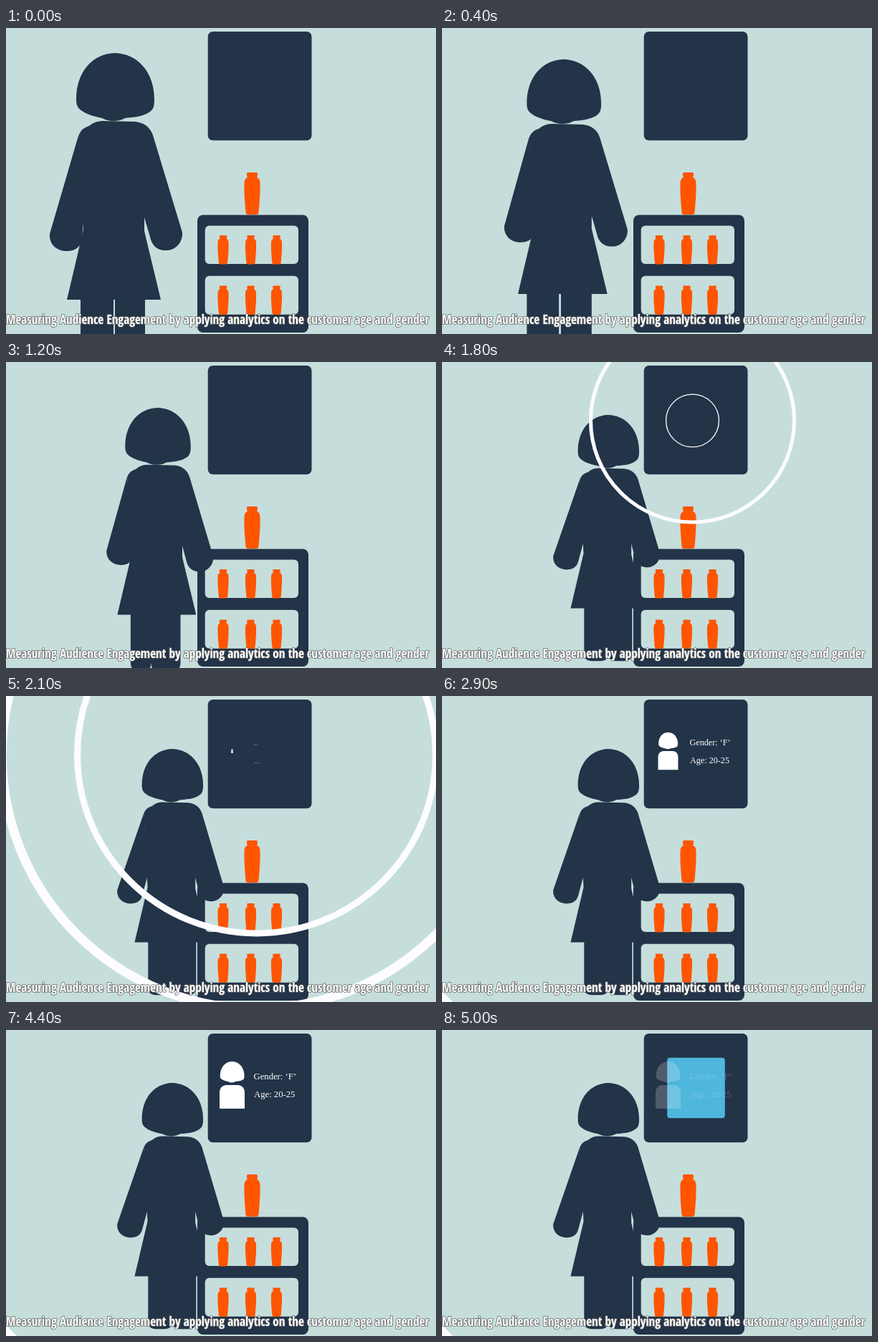
An HTML page for the animation above (5.1 s loop, 600 px wide and 428 px high).

```html
<!DOCTYPE html>
<html lang="en">
<head>
<meta charset="utf-8">
<title>Audience engagement</title>
<style>
  html, body { margin: 0; width: 100%; height: 100%; overflow: hidden; background: #c5dedc; }
  svg { display: block; width: 600px; height: 428px; }
  .dark { fill: #233348; }
  .light { fill: #c5dedc; }
  .label { font: 12.7px "Liberation Serif", serif; }
  #caption {
    font: 800 15px "Open Sans Condensed", "Roboto Condensed", "Open Sans", sans-serif;
    font-stretch: 75%;
    fill: #fff; stroke: #666; stroke-width: 1.6px; stroke-linejoin: round; paint-order: stroke;
  }
</style>
</head>
<body>
<svg viewBox="0 0 600 428">
  <defs>
    <path id="hair" d="M152 35C184 36 207 62 207 100C207 113 204 116 196 120C188 124 177 125 166 126Q160 130 150 130Q141 130 134 126C124 124 113 121 106 116C100 112 98 108 98 100C98 62 120 36 152 35Z"/>
    <path id="bottle" d="M-6 0H6Q7.500 0 7.500 2V5L6.500 7Q11 8.500 11 15C11.500 30 10 44 9 56Q8.500 59 6 59H-6Q-8.500 59 -9 56C-10 44 -11.500 30 -11 15Q-11 8.500 -6.500 7L-7.500 5V2Q-7.500 0 -6 0Z"/>
  </defs>

  <rect class="light" width="600" height="428"/>
  <rect class="dark" x="281.700" y="5" width="144.800" height="152.300" rx="7"/>
  <rect id="panel" fill="#4fb6dc"/>
  <g id="profile" fill="#fff">
    <g id="icon">
      <use href="#hair" transform="translate(315.500 44) scale(.31) translate(-152 -35)"/>
      <path d="M298 110V88C298 82 301 77 308 77H323C330 77 333 82 333 88V110Z"/>
    </g>
    <text class="label" id="gender">Gender: ‘F’</text>
    <text class="label" id="age">Age: 20-25</text>
  </g>

  <rect class="dark" x="267" y="261.500" width="155" height="164.500" rx="8"/>
  <rect class="light" x="277.700" y="276.500" width="130.300" height="53.500" rx="6"/>
  <rect class="light" x="277.700" y="346.700" width="130.300" height="54" rx="6"/>
  <g id="bottles" fill="#ff5500"></g>

  <g id="woman" class="dark">
    <use href="#hair"/>
    <path d="M101.500 150Q105 140 116 137Q124 130 135 130L180 131Q199 133 205 150L193 267V284L216 380H85L108 282Z"/>
    <path id="leftArm"/>
    <path id="rightArm"/>
    <path id="legs"/>
  </g>

  <g fill="none" stroke="#fdfcff">
    <circle class="ring" cx="349.500" cy="82"/>
    <circle class="ring" cx="349.500" cy="82"/>
  </g>
  <text id="caption" x="0" y="413.500">Measuring Audience Engagement by applying analytics on the customer age and gender</text>
</svg>
<script>
const LOOP = 5100, STEP = 100;
const $ = id => document.getElementById(id);
const set = (el, attrs) => { for (const k in attrs) el.setAttribute(k, attrs[k]); };
const ramp = (t, start, length) => Math.min(1, Math.max(0, (t - start) / length));
const mix = (a, b, p) => a + (b - a) * p;

// Bottles: one on top, three on each shelf
const bottles = [[343.5, 202, 1]];
for (const y of [290, 360.5]) for (const x of [303, 341.5, 377.5]) bottles.push([x, y, .685]);
$('bottles').innerHTML = bottles
  .map(([x, y, s]) => `<use href="#bottle" transform="translate(${x} ${y}) scale(${s})"/>`).join('');

// Walking pose: time, left hand dx and dy, left leg start and end, right leg start and end
const POSES = [
  [0, 0, 0, 104, 150, 152, 194],
  [400, 4, -8, 98, 145, 148, 193],
  [1200, 6, -15, 107, 141, 141, 190],
  [1600, -7, -1, 109, 152, 152, 194.5]
];

function poseAt(t) {
  let i = 0;
  while (i < POSES.length - 2 && t >= POSES[i + 1][0]) i++;
  const a = POSES[i], b = POSES[i + 1];
  const p = ramp(t, a[0], b[0] - a[0]);
  return a.slice(1).map((v, k) => mix(v, b[k + 1], p));
}

const leg = (a, b) =>
  `M${a} 370H${b}V460Q${b} 474 ${b - 14} 474H${a + 14}Q${a} 474 ${a} 460Z`;

// Outer edge, rounded hand, inner edge; the hand moves by dx, dy
function arm(id, shoulder, hand, inner, dx, dy) {
  const [start, ...rest] = hand.map(([x, y]) => `${x + dx} ${y + dy}`);
  set($(id), { d: `M${shoulder}L${start}C${rest.join(' ')}L${inner}Z` });
}

function drawWoman(t) {
  const p = ramp(t, 60, 1530);
  const [dx, dy, a, b, c, d] = poseAt(t);
  set($('woman'), {
    transform: `translate(${mix(152, 232, p)} ${mix(35, 74, p)}) scale(${mix(1, .784, p)}) translate(-152 -35)`
  });
  arm('leftArm', '101.5 149',
    [[61, 288], [60, 302], [70, 312], [85, 312], [97, 312], [104, 306], [106, 296]],
    '109 258', dx, dy);
  arm('rightArm', '205 150',
    [[246, 286], [247, 300], [236, 312], [222, 311], [210, 311], [203, 303], [201, 292]],
    '193 265L180 150', -2 * p, -4 * p);
  set($('legs'), { d: leg(a, b) + leg(c, d) });
}

function drawRings(t) {
  document.querySelectorAll('.ring').forEach((ring, i) => {
    const r = 490 * ramp(t, 1600 + 148 * i, 690);
    set(ring, { r, 'stroke-width': r * .036 });
  });
}

function drawScreen(t) {
  const zoom = (id, x, y, s, back = '') =>
    set($(id), { transform: `translate(${x} ${y}) scale(${s})${back}` });
  const text = ramp(t, 1990, 950);
  zoom('icon', 315.5, 77, ramp(t, 2010, 1115), ' translate(-315.5 -77)');
  zoom('gender', 345.5, 69, text);
  zoom('age', 346, 94, text);
  set($('profile'), { opacity: 1 - ramp(t, 4480, 650) });

  const k = ramp(t, 4500, 900), w = 145 * k, h = 152 * k;
  set($('panel'), { x: 354.5 - w / 2, y: 81 - h / 2, width: w, height: h, rx: 7 * k });
}

// Font size follows the measured line, so the caption spans the stage in any fallback font
const caption = $('caption');
caption.style.fontSize = 15 * 591 / caption.getComputedTextLength() + 'px';

const began = performance.now();
function frame() {
  const t = Math.floor((performance.now() - began) % LOOP / STEP) * STEP;
  drawWoman(t);
  drawRings(t);
  drawScreen(t);
  requestAnimationFrame(frame);
}
frame();
</script>
</body>
</html>
```
